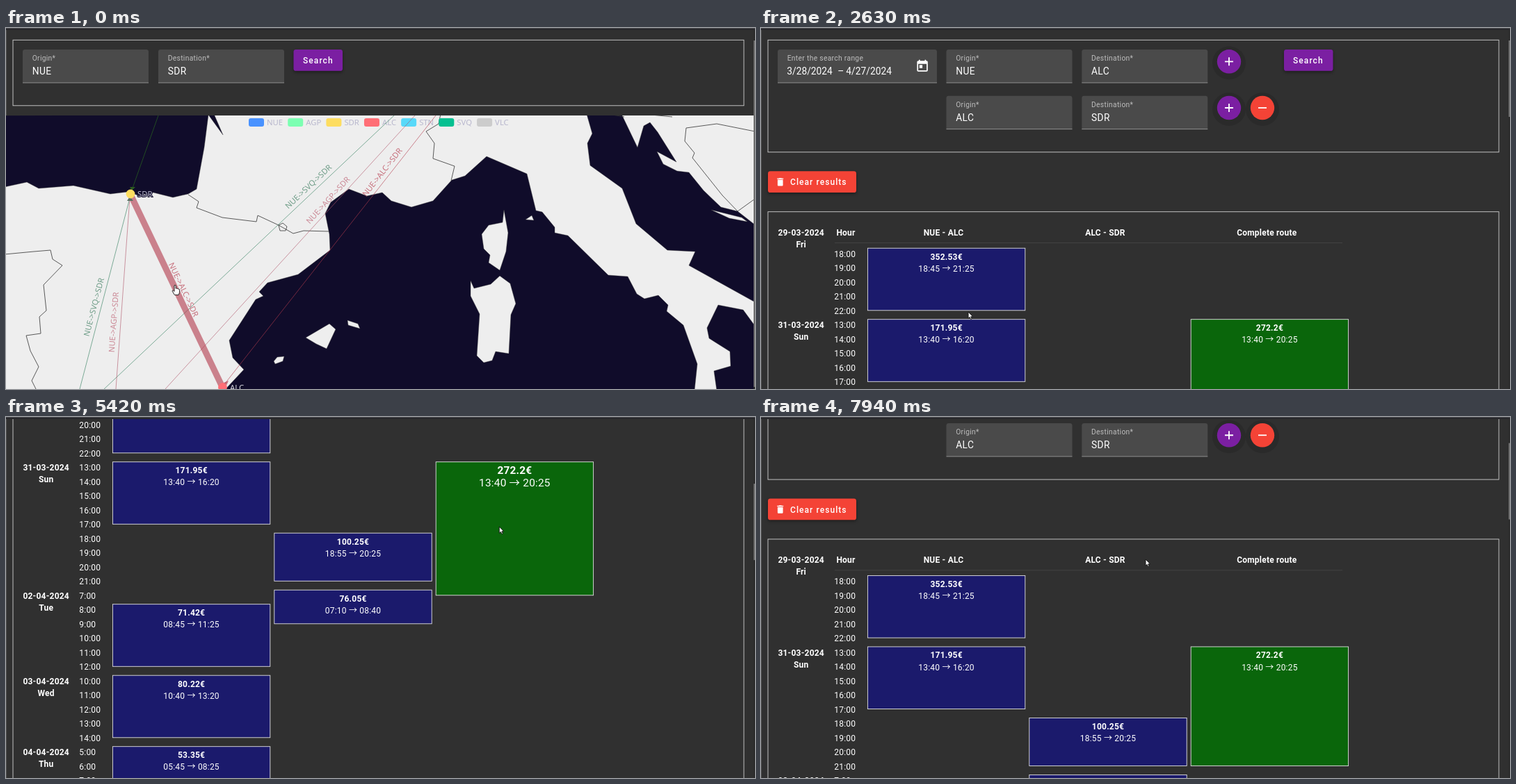
An HTML page that plays this animation: 1077x520 px, repeating every 8000 ms.

```html
<!DOCTYPE html>
<html lang="en">
<head>
<meta charset="utf-8">
<title>Route search</title>
<style>
  html, body { margin: 0; width: 100%; height: 100%; overflow: hidden; background: #303030; }
  svg { display: block; width: 1077px; height: 520px; }
  text { font: 12px Roboto, "Noto Sans", "Noto Sans CJK JP", sans-serif; letter-spacing: .214px; fill: #fff; white-space: pre; }
  .mid { text-anchor: middle; }
  .bold { font-weight: 700; }
  .big { font-size: 15.43px; }
  .label { font-size: 10.29px; letter-spacing: .32px; fill: #bdbdbd; }
  .input { font-size: 13.71px; letter-spacing: .43px; }
  .date { font-size: 13.71px; letter-spacing: .05px; }
  .button { font-weight: 500; letter-spacing: 1.07px; }
  .geo { font: 11.3px "Noto Sans", "Open Sans", sans-serif; letter-spacing: 0; }
  .link { font: 13.4px "Noto Sans", "Open Sans", sans-serif; letter-spacing: 0; fill: #47148c; text-decoration: underline; }
  .raised { filter: drop-shadow(0 2px 2px rgba(0,0,0,.4)); }
  .tip { filter: drop-shadow(1px 2px 4px rgba(0,0,0,.25)); }
</style>
</head>
<body>
<svg id="stage" viewBox="0 0 1077 520"></svg>
<script>
const LOOP = 8000;
const stage = document.getElementById('stage');

function el(parent, tag, attrs = {}, content) {
  const node = document.createElementNS('http://www.w3.org/2000/svg', tag);
  for (const key in attrs) node.setAttribute(key, attrs[key]);
  if (content !== undefined) node.textContent = content;
  parent.appendChild(node);
  return node;
}
const group = (parent, attrs) => el(parent, 'g', attrs);
const rect = (parent, x, y, width, height, fill, more = {}) =>
  el(parent, 'rect', { x, y, width, height, fill, ...more });
const path = (parent, d, more) => el(parent, 'path', { d, ...more });
// y is the middle of the capitals
const text = (parent, x, y, str, cls = '', size = 12, more = {}) =>
  el(parent, 'text', { x, y: y + size * .356, class: cls, ...more }, str);
const show = (node, on) => node.setAttribute('visibility', on ? 'visible' : 'hidden');

/* ---------- form parts ---------- */
function field(parent, x, y, width, label, value) {
  path(parent, `M${x} ${y + 48}v-44.6q0-3.4 3.4-3.4h${width - 6.8}q3.4 0 3.4 3.4v44.6z`, { fill: '#4a4a4a' });
  rect(parent, x, y + 47.4, width, 1, '#8e8e8e');
  text(parent, x + 13.7, y + 12.8, label, 'label', 10.29);
  if (value) text(parent, x + 13.7, y + 31.2, value, 'input', 13.71);
}
function button(parent, x, y, width, fill, label, labelX) {
  rect(parent, x, y, width, 30.8, fill, { rx: 3.4, class: 'raised' });
  text(parent, labelX, y + 15.8, label, 'button');
}
function roundButton(parent, x, y, fill, sign) {
  el(parent, 'circle', { cx: x, cy: y + 2, r: 24, fill: '#000', opacity: .12 });
  el(parent, 'circle', { cx: x, cy: y, r: 17.2, fill });
  path(parent, `M${x - 6} ${y}h12` + (sign === '+' ? `M${x} ${y - 6}v12` : ''), { stroke: '#fff', 'stroke-width': 1.8 });
}
const panel = (parent, y, height) =>
  rect(parent, 10, y, 1051, height, 'none', { stroke: '#d0d0d0', 'stroke-width': .9 });

rect(stage, 0, 0, 1077, 520, '#303030');
rect(stage, 0, 3, 1, 517, '#505050');

/* ---------- map view ---------- */
const mapView = group(stage);
panel(mapView, 17.3, 94.5);
field(mapView, 24, 31, 181, 'Origin*', 'NUE');
field(mapView, 219, 31, 181, 'Destination*', 'SDR');
button(mapView, 413.5, 31, 70.5, '#7b1fa2', 'Search', 427);

const clip = el(el(stage, 'defs'), 'clipPath', { id: 'frame' });
rect(clip, 0, 126, 1075, 394, '#000');
const map = group(mapView, { 'clip-path': 'url(#frame)' });
const LAND = '#eeeeee', SEA = '#100c2a';
rect(map, 0, 126, 1077, 394, LAND);

const shape = (d, fill) => path(map, `M${d}z`, { fill, stroke: '#333', 'stroke-width': .4 });
// Bay of Biscay
shape('-2 126V229L30 222 47 231 97 227 150 239 175 236 190 241 212 237 240 244 262 239 274 232 285 172 291 125 312 154 299 124', SEA);
// western Mediterranean
shape('314 522L342 492 326 475 321 450 359 391 370 386 364 380 376 367 420 355 466 320 465 297 459 267 467 251 493 232 519 242 '
  + '541 237 554 249 583 258 614 249 641 219 660 213 691 185 749 210 762 263 771 265 789 287 789 295 808 299 866 356 894 358 '
  + '907 383 918 390 938 385 952 399 950 408 974 428 994 484 990 522', SEA);
// Ionian
shape('1022 522L1018 494 1042 487 1041 466 1011 447 1008 432 1024 399 1060 406 1079 432V522', SEA);
// Adriatic
shape('835 124L843 152 836 166 840 198 886 231 906 282 951 320 991 322 982 342 1079 396V285L1052 264 1028 258 1003 234 982 208 '
  + '965 206 945 196 936 178 964 193 937 150 926 136 917 141 908 172 885 124', SEA);
// Corsica, Sardinia and the smaller islands
shape('716 262L722 295 719 322 710 349 694 338 696 327 687 318 684 297 694 284 714 280', LAND);
shape('710 357L725 368 733 397 726 413 723 469 704 466 699 479 687 482 677 472 681 412 668 386 668 364 673 375 697 369', LAND);
shape('747 276L756 270 759 277', LAND);
shape('431 446L465 426 474 434 461 462 446 455', LAND);
shape('491 421L506 426 509 433 492 428', LAND);
shape('385 480L390 474 400 473 398 480 387 484', LAND);
shape('1014 262L1058 273 1066 279 1040 274', LAND);
// land borders
path(map, 'M262 240L277 250 274 259 311 273 360 279 362 270 392 284 413 296 428 292 465 293M398 281l6 5-2 6h-8l-2-8z'
  + 'M-2 326L40 322 64 320 67 333 81 342 54 370 58 407 48 416 50 440 29 443 35 465 47 488 37 508 44 522'
  + 'M625 124L622 138 604 149 616 166 614 188 645 199 640 220'
  + 'M1077 149L1022 138 978 144 976 163 990 180 987 187 1030 241 1052 264 1077 246M866 124L889 128M918 124L958 128',
  { fill: 'none', stroke: '#333', 'stroke-width': .8 });

const COLORS = { NUE: '#4992ff', AGP: '#7cffb2', SDR: '#fddd60', ALC: '#ff6e76', STN: '#58d9f9', SVQ: '#05c091', VLC: '#cccccc' };
let legendX = 349;
for (const [name, color] of Object.entries(COLORS)) {
  rect(map, legendX, 130, 22, 12, color, { rx: 3 });
  const label = text(map, legendX + 26, 136, name, 'geo', 11.3, { style: 'fill:#b9b8ce' });
  legendX += 33.1 + label.getComputedTextLength();
}

const STYLE = {
  SVQ: { stroke: '#2f7d5c', fill: '#6f9d88' },
  AGP: { stroke: '#b0566a', fill: '#cb8996' },
  ALC: { stroke: '#b33a4c', fill: '#c7707d' }
};
// a line from left to right, its name floating above the point at share p
function route(via, x1, y1, x2, y2, p) {
  const { stroke, fill } = STYLE[via];
  const a = Math.atan2(y2 - y1, x2 - x1);
  const x = x1 + (x2 - x1) * p + 10.2 * Math.sin(a), y = y1 + (y2 - y1) * p - 10.2 * Math.cos(a);
  const line = path(map, `M${x1} ${y1}L${x2} ${y2}`, { stroke, opacity: .6, 'stroke-width': 1 });
  text(map, 0, 0, `NUE->${via}->SDR`, 'geo mid', 11.3,
    { transform: `translate(${x} ${y}) rotate(${a * 180 / Math.PI})`, style: `fill:${fill}` });
  return line;
}
route('SVQ', 140, 521, 558, 126, .722);
route('AGP', 229, 520, 588, 126, .673);
route('ALC', 311, 517, 618, 126, .775);
route('SVQ', 106, 520, 178, 245, .42);
route('AGP', 158, 520, 178, 245, .347);
const activeRoute = route('ALC', 180, 242, 311, 517, .506);
path(map, 'M219 126L180 236', { stroke: '#2b6b1f', opacity: .65 });
path(map, 'M174 249l4-6 5 6z', { fill: '#5b6f62' });
path(map, 'M178 229h8l-5 5z', { fill: '#2b5a1f' });
path(map, 'M313 511l7-3-4 9z', { fill: STYLE.ALC.stroke, opacity: .7 });

el(map, 'circle', { cx: 179, cy: 239, r: 6.4, fill: COLORS.SDR });
el(map, 'circle', { cx: 311.5, cy: 517.5, r: 6.4, fill: COLORS.ALC });
text(map, 189, 238.7, 'SDR', 'geo', 11.3, { style: 'fill:#b9b8ce;stroke:#100c2a;stroke-width:2px;paint-order:stroke' });
text(map, 322, 517.5, 'ALC', 'geo', 11.3, { style: 'fill:#d5d5dd' });

const tooltip = group(mapView);
rect(tooltip, 260.8, 387.7, 119, 35.5, '#fff', { rx: 3.5, stroke: '#b8606c', class: 'tip' });
text(tooltip, 269.5, 405.8, 'NUE->ALC->SDR', 'link', 13.4);

/* ---------- results view ---------- */
const page = group(stage);
const form = group(page);
panel(form, 17.3, 161.5);
field(form, 24, 31, 229, 'Enter the search range');
text(form, 37.2, 62.2, '3/28/2024', 'date', 13.71);
text(form, 110.3, 62.2, '–', 'date', 13.71);
text(form, 122.3, 62.2, '4/27/2024', 'date', 13.71);
path(form, 'M19 3h-1V1h-2v2H8V1H6v2H5c-1.1 0-2 .9-2 2v14c0 1.1.9 2 2 2h14c1.1 0 2-.9 2-2V5c0-1.1-.9-2-2-2zm0 16H5V8h14zM7 10h5v5H7z',
  { transform: 'translate(221.8 44.8) scale(.857)', fill: '#fff' });
[['NUE', 'ALC'], ['ALC', 'SDR']].forEach(([from, to], i) => {
  const y = 31 + 66.7 * i;
  field(form, 266.5, y, 181, 'Origin*', from);
  field(form, 461.3, y, 181, 'Destination*', to);
  roundButton(form, 673, y + 17.3, '#7b1fa2', '+');
});
roundButton(form, 721, 115, '#f44336', '-');
button(form, 752, 31, 70.5, '#7b1fa2', 'Search', 765);

const results = group(page);
button(results, 10, 206.3, 127, '#f44336', 'Clear results', 42);
path(results, 'M6 19c0 1.1.9 2 2 2h8c1.1 0 2-.9 2-2V7H6zM19 4h-3.5l-1-1h-5l-1 1H5v2h14z',
  { transform: 'translate(20 214) scale(.643)', fill: '#fff' });
panel(results, 264.7, 1400);

const ROW = 20.5, COLUMN = 232.4;
const rowY = i => 325.5 + ROW * i;
text(results, 122, 294.3, 'Hour', 'bold mid');
['NUE - ALC', 'ALC - SDR', 'Complete route'].forEach((name, i) => text(results, 262.5 + COLUMN * i, 294.3, name, 'bold mid'));
rect(results, 106, 309, 730, 1, '#424242');

// date, day, first hour, number of hours
let row = 0;
[['29-03-2024', 'Fri', 18, 5], ['31-03-2024', 'Sun', 13, 9], ['02-04-2024', 'Tue', 7, 6],
 ['03-04-2024', 'Wed', 10, 5], ['04-04-2024', 'Thu', 5, 5]].forEach(([date, day, first, count], i) => {
  const y = i ? rowY(row) : 294.3;
  text(results, 57.7, y, date, 'bold mid');
  text(results, 57.7, y + 17.1, day, 'bold mid');
  for (let h = 0; h < count; h++) text(results, 105.3, rowY(row++), `${first + h}:00`);
});

// column, first row, hours, price, times
const flights = [
  [0, 0, 4, '352.53', '18:45 → 21:25'], [0, 5, 4, '171.95', '13:40 → 16:20'],
  [0, 15, 4, '71.42', '08:45 → 11:25'], [0, 20, 4, '80.22', '10:40 → 13:20'],
  [0, 25, 4, '53.35', '05:45 → 08:25'], [1, 10, 3, '100.25', '18:55 → 20:25'],
  [1, 14, 2, '76.05', '07:10 → 08:40'], [2, 5, 8, '272.2', '13:40 → 20:25']
].map(([col, first, hours, price, times]) => {
  const x = 153.4 + COLUMN * col, top = rowY(first) - 8.3, width = 226.4, height = hours * ROW + 7.6;
  const box = rect(results, x, top, width, height, col === 2 ? '#0a660b' : '#1b1a6c', { stroke: '#e2e2e2', 'stroke-width': .9 });
  const lines = [[price + '€', 'bold mid'], [times, 'mid']].map(([str, cls], i) => {
    const y = top + 12.2 + 17.2 * i;
    return { cls, y, node: text(results, x + width / 2, y, str, cls) };
  });
  return { box, x, top, width, height, lines };
});

/* ---------- window edges, scrollbar, pointer ---------- */
rect(stage, 0, 0, 1077, 3, '#26262a');
rect(stage, 0, 0, 1077, 1, '#48484d');
rect(stage, 1075, 3, 2, 517, '#2a2a2a');
const thumb = rect(stage, 1075, 18, 2, 110, '#6e6e6e');
const ink = { fill: '#fff', stroke: '#111', 'stroke-width': .9, 'stroke-linejoin': 'round' };
const arrow = path(stage, 'M0 0V9.2L2.1 7.4 3.6 10.6 5.1 9.9 3.7 6.8H6.6z', ink);
const hand = path(stage, 'M-1 1Q0-.6 1.2 1V5.2Q2.4 4.2 3.2 5.6 4.4 4.8 5 6.2 6.6 5.8 6.6 7.6V10.5L5.2 14.5H-.6L-3.8 9.2Q-4 7.6-2.6 8L-1 9.4z', ink);

/* ---------- motion ---------- */
const TO_ARROW = 1530, TO_PAGE = 1800, FORM_READY = 2230, RESULTS_READY = 2510;
const NOTCH = 88.75, NOTCH_MS = 285, GROW_MS = 250;
const wheelDown = [3985, 4205, 4675, 4750], wheelUp = [6130, 6261, 6584];
// time, x, y
const pointerPath = [
  [650, 243, 370], [1130, 295, 406], [TO_ARROW, 295, 409], [2510, 295, 409], [2630, 298, 409], [3000, 322, 404],
  [3470, 322, 404], [3850, 428, 302], [4120, 447, 278], [4760, 447, 278], [5420, 710, 158], [6020, 286, 136],
  [6510, 286, 136], [6910, 297, 185], [7310, 430, 246], [7560, 513, 210], [7800, 447, 197], [7940, 553, 205]
];

function ease(p) {
  p = Math.min(1, Math.max(0, p));
  return p * p * p * (p * (6 * p - 15) + 10);
}
function pointerAt(t) {
  const i = pointerPath.findIndex(k => k[0] > t);
  if (i < 1) return pointerPath.at(i).slice(1);
  const [t0, x0, y0] = pointerPath[i - 1], [t1, x1, y1] = pointerPath[i];
  const p = (t - t0) / (t1 - t0);
  return [x0 + (x1 - x0) * p, y0 + (y1 - y0) * p];
}
function scrollAt(t) {
  const notches = starts => starts.reduce((sum, s) => sum + ease((t - s) / NOTCH_MS), 0);
  return NOTCH * (notches(wheelDown) - notches(wheelUp));
}
function hoveredAt(t) {
  if (t < RESULTS_READY) return undefined;
  const [x, y] = pointerAt(t), pageY = y + scrollAt(t);
  return flights.find(f => x > f.x && x < f.x + f.width && pageY > f.top && pageY < f.top + f.height);
}

function draw(t) {
  const onMap = t < TO_PAGE, pointing = t < TO_ARROW;
  show(mapView, onMap);
  show(tooltip, onMap && t >= 530);
  show(form, t >= FORM_READY);
  show(results, t >= RESULTS_READY);
  activeRoute.setAttribute('stroke-width', 9 - 8 * ease((t - 700) / 400));

  const scroll = scrollAt(t);
  page.setAttribute('transform', `translate(0 ${-scroll})`);
  thumb.setAttribute('y', 18 + scroll * .22);
  thumb.setAttribute('height', t < RESULTS_READY ? 499 : 110);

  // a box grows with the share of the last moments spent under the pointer
  const recent = Array.from({ length: 25 }, (_, i) => hoveredAt(t - GROW_MS * i / 25));
  for (const flight of flights) {
    const active = recent[0] === flight;
    const share = recent.filter(f => f === flight).length / recent.length;
    flight.box.setAttribute('height', flight.height + ROW * ease(share));
    for (const { node, cls, y } of flight.lines) {
      node.setAttribute('class', active ? cls + ' big' : cls);
      node.setAttribute('y', y + (active ? 15.43 : 12) * .356);
    }
  }

  show(hand, pointing);
  show(arrow, !pointing);
  (pointing ? hand : arrow).setAttribute('transform', `translate(${pointerAt(t).join(' ')})`);
}

const start = performance.now();
function loop() {
  draw((performance.now() - start) % LOOP);
  requestAnimationFrame(loop);
}
loop();
</script>
</body>
</html>
```
